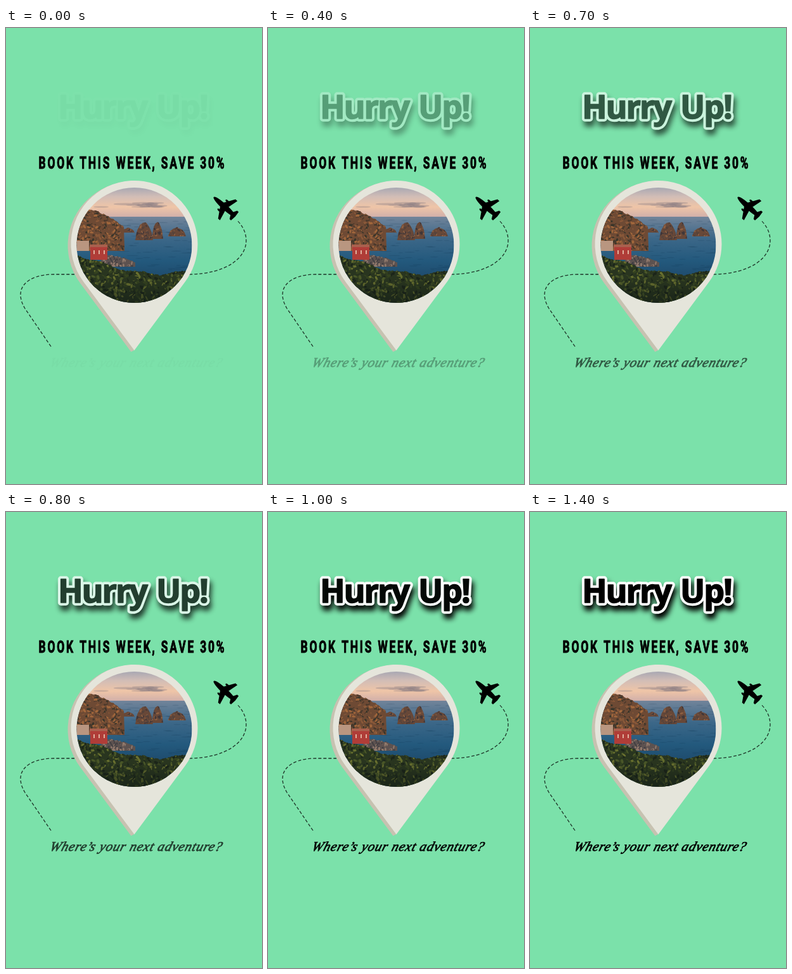
An HTML page with a canvas that plays this animation: 404x720 px, repeating every 3 s.

```html
<!DOCTYPE html>
<html lang="en">
<head>
<meta charset="utf-8">
<title>Travel offer</title>
<style>
  html, body { margin: 0; width: 100%; height: 100%; overflow: hidden; background: #7be1aa; }
  canvas { position: absolute; left: 0; top: 0; width: 404px; height: 720px; }
</style>
</head>
<body>
<canvas id="scene" width="404" height="720"></canvas>
<canvas id="words" width="404" height="720"></canvas>
<script>
const LOOP = 3000, STEP = 100, FADE = 1030;
const HEAD = { x: 202.5, y: 341, r: 100 };
const VIEW = { x: 202.5, y: 343, r: 91 };
const scene = document.getElementById('scene').getContext('2d');
const wordsEl = document.getElementById('words');
const words = wordsEl.getContext('2d');

let seed = 7;
function rand(lo = 0, hi = 1) {
  seed = (seed * 16807) % 2147483647;
  return lo + (hi - lo) * seed / 2147483647;
}

function box(c, color, x, y, w, h) {
  c.fillStyle = color;
  c.fillRect(x, y, w, h);
}

function oval(c, color, x, y, rx, ry, turn = 0) {
  c.fillStyle = color;
  c.beginPath();
  c.ellipse(x, y, rx, ry, turn, 0, Math.PI * 2);
  c.fill();
}

function band(c, y0, y1, ...colors) {
  const g = c.createLinearGradient(0, y0, 0, y1);
  colors.forEach((col, i) => g.addColorStop(i / (colors.length - 1), col));
  box(c, g, VIEW.x - VIEW.r, y0, VIEW.r * 2, y1 - y0);
}

// A jagged ground shape below top(u), u running 0..1, grained with flecks
function ridge(c, x0, x1, base, top, size, colors) {
  const path = new Path2D();
  const w = x1 - x0;
  path.moveTo(x0, base);
  for (let x = x0; x <= x1; x += 2) path.lineTo(x, top((x - x0) / w) + rand(-1, 1));
  path.lineTo(x1, base);
  c.save();
  c.fillStyle = colors[0];
  c.fill(path);
  c.clip(path);
  const high = Math.min(top(0), top(0.25), top(0.5), top(0.75), top(1));
  const count = w * (base - high) / (size * size * 1.6);
  for (let i = 0; i < count; i++) {
    const col = colors[Math.floor(rand(0, colors.length))];
    oval(c, col, rand(x0, x1), rand(high, base),
      size * rand(0.4, 1.1), size * rand(0.2, 0.6), rand(0, 3));
  }
  c.restore();
}

function seaStack(c, x, halfWidth, base, height) {
  const top = u => base - height * Math.pow(Math.sin(Math.PI * u), 0.6);
  ridge(c, x - halfWidth, x + halfWidth, base, top, 2.6,
    ['#684838', '#8f6042', '#403638', '#55433b']);
}

function drawRoute(c) {
  c.strokeStyle = '#1d3528';
  c.lineWidth = 1.3;
  c.setLineDash([5, 3]);
  c.stroke(new Path2D('M71 503 L30 443 C10 410 35 389 75 389 L108 389'));
  c.stroke(new Path2D('M289 389 C350 388 379 362 379 336 C379 322 373 312 364 303'));
  c.setLineDash([]);
}

function pinShape(c, dx, dy, color) {
  const drop = 168;
  const a = Math.PI / 2 - Math.acos(HEAD.r / drop);
  c.fillStyle = color;
  c.beginPath();
  c.arc(HEAD.x + dx, HEAD.y + dy, HEAD.r, Math.PI - a, a);
  c.lineTo(HEAD.x + dx, HEAD.y + dy + drop);
  c.fill();
}

function drawPin(c) {
  for (let k = 5; k > 0; k--) pinShape(c, -k, k / 2, '#c7c2b1');
  pinShape(c, 0, 0, '#e5e5db');
}

function drawView(c) {
  c.save();
  c.beginPath();
  c.arc(VIEW.x, VIEW.y, VIEW.r, 0, Math.PI * 2);
  c.clip();

  band(c, 250, 299, '#a3a5b2', '#d2bdb6', '#efc5a7', '#cfaeaa');
  c.globalAlpha = 0.35;
  for (let i = 0; i < 14; i++) {
    oval(c, '#80757f', rand(150, 245), rand(276, 283), rand(8, 22), rand(1, 2.5));
  }
  c.globalAlpha = 1;

  band(c, 298, 436, '#71849a', '#3c6788', '#23597d', '#1d4768', '#17364c');
  c.globalAlpha = 0.15;
  for (let i = 0; i < 60; i++) {
    oval(c, '#0d2c47', rand(185, 295), rand(303, 385), rand(3, 10), 0.7);
  }
  c.globalAlpha = 1;

  seaStack(c, 193, 10, 323, 7);
  seaStack(c, 218, 14, 335, 28);
  seaStack(c, 239, 9, 333, 26);
  seaStack(c, 270, 14, 329, 14);

  const cliffTop = u => 283 + 32 * u * u + 60 * Math.max(0, 0.3 - u);
  ridge(c, 108, 187, 352, cliffTop, 3.2,
    ['#6e4a34', '#a3683c', '#4b392c', '#39352a', '#8a5939']);
  ridge(c, 150, 204, 377, u => 358 + 12 * u * u, 2.8,
    ['#5d5250', '#927a6c', '#413e42']);

  box(c, '#b99680', 112, 336, 19, 16);
  box(c, '#a9604e', 132, 342, 28, 5);
  box(c, '#b03d38', 133, 346, 27, 20);
  for (let x = 138; x < 158; x += 8) box(c, '#dfb09c', x, 351, 2, 6);

  const shrubTop = u => 356 + 32 * Math.sin(2.2 * u) + 2 * Math.sin(20 * u);
  ridge(c, 108, 298, 438, shrubTop, 3.4,
    ['#29351f', '#4a5728', '#69702f', '#1b2419', '#35421f']);
  band(c, 395, 436, 'rgba(15,25,20,0)', 'rgba(15,25,20,.6)');
  c.restore();
}

function drawPlane(c) {
  const fin = (side, root, span, sweep, chord) => {
    c.beginPath();
    c.moveTo(root, 0);
    c.lineTo(root - sweep, side * span);
    c.lineTo(root - sweep - chord, side * span);
    c.lineTo(root - chord * 3, 0);
    c.fill();
  };
  c.save();
  c.translate(345.5, 283);
  c.rotate(Math.atan2(-0.67, -0.74));
  oval(c, '#000', 1, 0, 23, 4.4);
  for (const side of [1, -1]) {
    fin(side, 9, 20.5, 13, 4);
    fin(side, -13, 9, 5, 3);
    oval(c, '#000', 3, side * 9.5, 4, 1.7);
  }
  c.restore();
}

function ink(c, text, x, y, weight) {
  c.fillStyle = c.strokeStyle = '#000';
  c.lineWidth = weight;
  c.strokeText(text, x, y);
  c.fillText(text, x, y);
}

function drawHeadline(c) {
  c.save();
  c.translate(51.5, 221.5);
  c.scale(0.67, 1);
  c.font = '700 26px Roboto, sans-serif';
  c.letterSpacing = '4.2px';
  ink(c, 'BOOK THIS WEEK, SAVE 30%', 0, 0, 1);
  c.restore();
}

function drawTitle(c) {
  const text = 'Hurry Up!', x = 82, y = 143;
  c.save();
  c.font = '700 52px "Open Sans", "Noto Sans", sans-serif';
  c.letterSpacing = '-2.2px';
  c.wordSpacing = '4px';
  c.lineJoin = 'round';
  c.strokeStyle = '#fff';
  c.lineWidth = 9.5;
  c.shadowColor = '#000';
  c.shadowBlur = 9;
  c.shadowOffsetX = 3;
  c.shadowOffsetY = 8;
  c.strokeText(text, x, y);
  c.shadowColor = 'transparent';
  ink(c, text, x, y, 1.5);
  c.restore();
}

function drawTagline(c) {
  c.save();
  c.translate(68, 534.5);
  c.transform(1, 0, -0.3, 1, 0, 0);
  c.font = 'italic 21px "Liberation Serif", "Noto Serif", serif';
  c.letterSpacing = '0.8px';
  ink(c, 'Where’s your next adventure?', 0, 0, 0.8);
  c.restore();
}

box(scene, '#7be1aa', 0, 0, 404, 720);
for (const draw of [drawRoute, drawPin, drawView, drawPlane, drawHeadline]) draw(scene);
for (const draw of [drawTitle, drawTagline]) draw(words);

const start = performance.now();
function tick() {
  const t = (performance.now() - start) % LOOP;
  const held = Math.floor(t / STEP) * STEP;
  const fade = Math.pow(Math.min(1, held / FADE), 1.3);
  wordsEl.style.opacity = Math.max(0.015, fade);
  requestAnimationFrame(tick);
}
tick();
</script>
</body>
</html>
```
